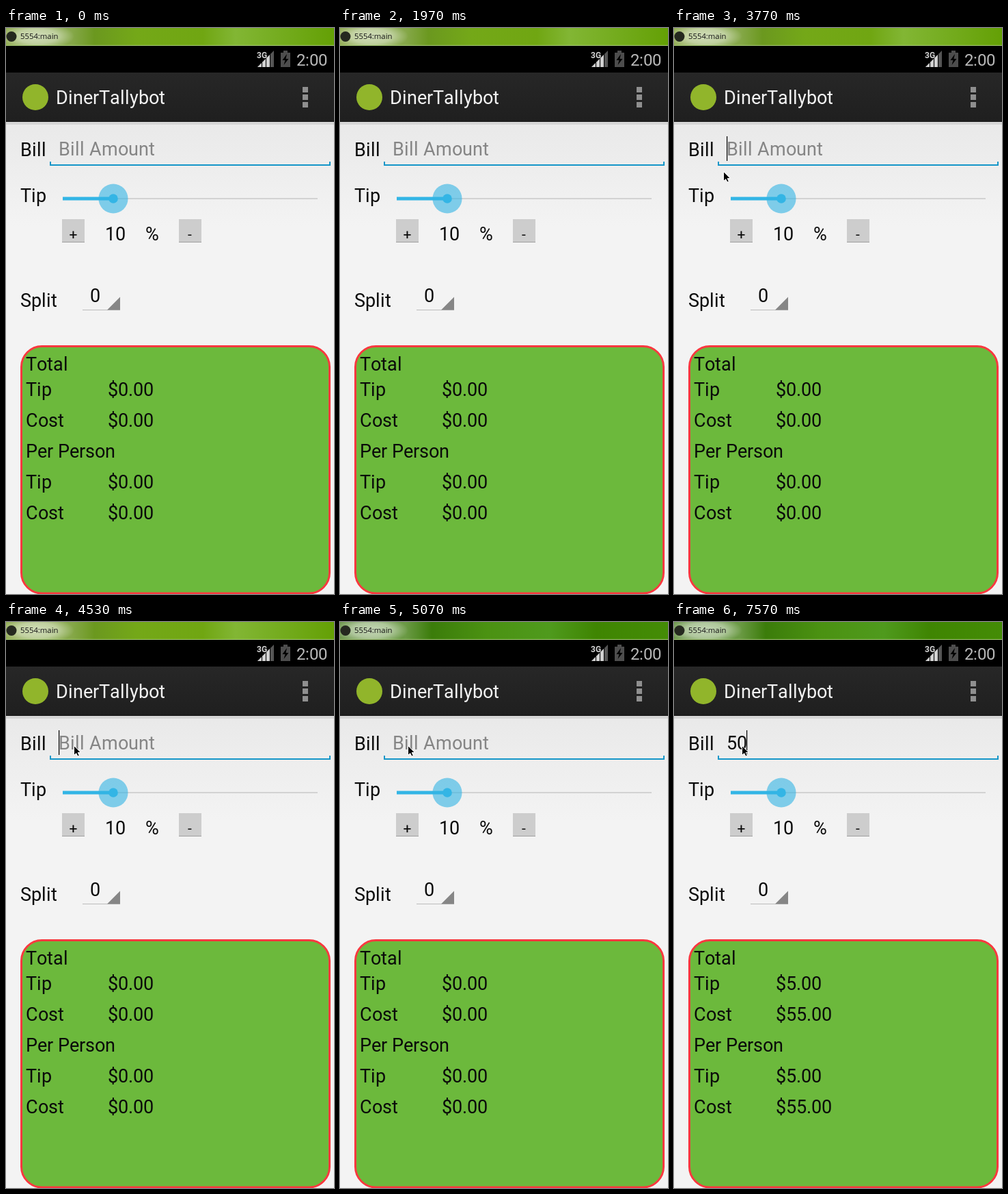
Recreate the animation shown at these times as an HTML page. Size 480 px wide and 826 px high, loop 8000 ms.

```html
<!DOCTYPE html>
<html lang="en">
<head>
<meta charset="utf-8">
<title>Tip form</title>
<style>
  html, body { margin: 0; width: 100%; height: 100%; overflow: hidden; background: #000; }
  svg { display: block; width: 480px; height: 826px; }
  text { font: 27px Roboto, sans-serif; fill: #0a0a0a; white-space: pre; }
  .clock { font-size: 24px; fill: #b9b9b9; }
  .net { font-size: 12px; font-weight: 700; fill: #d4d4d4; }
  .key { font-size: 21px; text-anchor: middle; }
  .name { fill: #f3f3f3; }
  .hint { fill: #858585; }
  .window { font: 11.3px "Open Sans", sans-serif; fill: #111; }
</style>
</head>
<body>
<svg viewBox="0 0 480 826">
  <defs>
    <linearGradient id="lime">
      <stop offset="0" stop-color="#94ae58"/>
      <stop offset=".2" stop-color="#86a84a"/>
      <stop offset=".27" stop-color="#6b981f"/>
      <stop offset=".4" stop-color="#74a818"/>
      <stop offset=".6" stop-color="#70a612"/>
      <stop offset=".7" stop-color="#82b634"/>
      <stop offset="1" stop-color="#64a005"/>
    </linearGradient>
    <linearGradient id="leaf">
      <stop offset="0" stop-color="#6f984e"/>
      <stop offset=".2" stop-color="#6b9a45"/>
      <stop offset=".28" stop-color="#3b7c0a"/>
      <stop offset=".45" stop-color="#4b9212"/>
      <stop offset=".64" stop-color="#4f9a1d"/>
      <stop offset=".78" stop-color="#3f8502"/>
      <stop offset="1" stop-color="#448c06"/>
    </linearGradient>
    <radialGradient id="glow">
      <stop offset="0" stop-color="#fff" stop-opacity=".6"/>
      <stop offset=".55" stop-color="#fff" stop-opacity=".45"/>
      <stop offset="1" stop-color="#fff" stop-opacity="0"/>
    </radialGradient>
    <linearGradient id="page" x2="0" y2="1">
      <stop offset="0" stop-color="#e9e9e9"/>
      <stop offset="1" stop-color="#f3f3f3"/>
    </linearGradient>
    <linearGradient id="bar" x2="0" y2="1">
      <stop offset="0" stop-color="#272727"/>
      <stop offset="1" stop-color="#1f1f1f"/>
    </linearGradient>
  </defs>

  <rect width="480" height="826"/>
  <rect id="frame" width="480" height="25" fill="url(#lime)"/>
  <ellipse cx="46" cy="12" rx="54" ry="20" fill="url(#glow)"/>
  <rect y="25" width="480" height="1" fill="#a9cf78"/>
  <rect y="26" width="480" height="20"/>
  <circle cx="8" cy="12.5" r="7.5" fill="#25291f"/>
  <text class="window" x="21" y="16">5554:main</text>

  <g id="app">
    <text class="net" x="367" y="44">3G</text>
    <path d="M392 33V57H368Z" fill="#555"/>
    <path d="M386 39V57H368Z" fill="#d0d0d0"/>
    <path d="M374.5 44V57M380.5 44V57M386.5 36V57" stroke="#000"/>
    <path d="M402 36H406V33H412V36H416V57H402Z" fill="#4d4d4d"/>
    <path d="M411 38L404.5 47H408.5L406.5 54L413.5 45H409.5Z"/>
    <text class="clock" x="425" y="55">2:00</text>

    <rect y="65" width="480" height="72" fill="url(#bar)"/>
    <circle cx="43" cy="101" r="19" fill="#91b52b"/>
    <text class="name" x="73" y="111">DinerTallybot</text>
    <path d="M434 86h8v8h-8zM434 97h8v8h-8zM434 108h8v8h-8z" fill="#8f8f8f"/>

    <rect y="137" width="480" height="689" fill="#f3f3f3"/>
    <rect y="137" width="480" height="153" fill="url(#page)"/>
    <rect y="136" width="480" height="1" fill="#111"/>
    <rect y="137" width="480" height="4" fill="#d5d5d5"/>

    <text x="21" y="187">Bill</text>
    <text id="bill" x="77" y="186"></text>
    <path d="M65 195V200H474V195" fill="none" stroke="#1596c8" stroke-width="2"/>

    <text x="21" y="254">Tip</text>
    <rect x="83" y="248" width="373" height="2" fill="#d2d2d2"/>
    <rect x="83" y="246.5" width="74" height="5" fill="#33b5e5"/>
    <circle cx="157" cy="249" r="21.5" fill="#33b5e5" fill-opacity=".6"/>
    <circle cx="157" cy="249" r="6.8" fill="#33b5e5"/>
    <path d="M82 279h33v33h-33zM253 279h33v33h-33z" fill="#cdcdcd"/>
    <path d="M82 312.5h33M253 312.5h33" stroke="#a0a0a0"/>
    <text class="key" x="98.5" y="308">+</text>
    <text class="key" x="269" y="308">-</text>
    <text x="145" y="310">10</text>
    <text x="204" y="310">%</text>

    <text x="21" y="407">Split</text>
    <text x="123" y="400">0</text>
    <path d="M112 411.5H167" stroke="#bcbcbc"/>
    <path d="M167 392.5V411.5H148Z" fill="#868686"/>

    <rect x="22.5" y="464.5" width="451" height="360.5" rx="30" fill="#6cb93c" stroke="#f9383f" stroke-width="3"/>
    <text x="29" y="500">Total</text>
    <text x="29" y="537">Tip</text>
    <text x="29" y="582">Cost</text>
    <text x="29" y="627">Per Person</text>
    <text x="29" y="672">Tip</text>
    <text x="29" y="717">Cost</text>
    <text class="tip" x="149" y="537"></text>
    <text class="cost" x="149" y="582"></text>
    <text class="tip" x="149" y="672"></text>
    <text class="cost" x="149" y="717"></text>
    <rect id="caret" y="158" width="1.2" height="36"/>
  </g>
  <path id="mouse" d="M.5 .5V14.5L3.7 11.6L6 16L8.3 15L6.2 10.5H10.3Z" stroke="#fff"/>
</svg>

<script>
const LOOP = 8000, RATE = 0.1;
const $ = id => document.getElementById(id);
const all = sel => document.querySelectorAll(sel);
const pen = document.createElement('canvas').getContext('2d');

// each track: [start ms, value...]
const carets = [
  [0, 0], [440, 77], [860, 0], [1390, 77], [1970, 0], [2490, 77], [3020, 0],
  [3630, 77], [4140, 0], [4530, 77], [5070, 0], [5750, 77], [6180, 91],
  [6430, 106], [6970, 0], [7570, 106]
];
const pointer = [
  [0, -50, -50], [3330, 43, 247], [3480, 63, 219], [3630, 64, 217],
  [3770, 72, 209], [3890, 82, 199], [4010, 91, 190], [4140, 97, 185],
  [4280, 98, 182], [4400, 99, 180]
];
const typed = [[0, ''], [6180, '5'], [6430, '50']];
const totals = [[0, 0], [6300, 5], [6430, 50]];
const screen = [[0, 1], [4670, 0], [5070, 1]];

const at = (track, t) => track.findLast(step => step[0] <= t).slice(1);
const money = n => '$' + n.toFixed(2);

// the phone sets each letter on a whole pixel
function snap(el) {
  const { fontWeight, fontSize, fontFamily } = getComputedStyle(el);
  pen.font = `${fontWeight} ${fontSize} ${fontFamily}`;
  let x = parseFloat(el.getAttribute('x'));
  const places = [...el.textContent].map(letter => {
    const left = x;
    x += Math.round(pen.measureText(letter).width);
    return left;
  });
  if (places.length) el.setAttribute('x', places.join(' '));
}

function write(el, text) {
  if (el.textContent === text) return;
  el.textContent = text;
  snap(el);
}

function draw(t) {
  const [caret] = at(carets, t), [x, y] = at(pointer, t);
  const [text] = at(typed, t), [bill] = at(totals, t);

  $('app').style.display = at(screen, t)[0] ? '' : 'none';
  $('frame').setAttribute('fill', t < 4670 ? 'url(#lime)' : 'url(#leaf)');
  $('bill').setAttribute('class', text ? '' : 'hint');
  write($('bill'), text || 'Bill Amount');
  $('caret').setAttribute('x', caret);
  $('caret').setAttribute('visibility', caret ? 'visible' : 'hidden');
  $('mouse').setAttribute('transform', `translate(${x} ${y})`);
  all('.tip').forEach(el => write(el, money(bill * RATE)));
  all('.cost').forEach(el => write(el, money(bill * (1 + RATE))));
}

all('text:not(.key, .window)').forEach(snap);
const start = performance.now();
function tick() {
  draw((performance.now() - start) % LOOP);
  requestAnimationFrame(tick);
}
tick();
</script>
</body>
</html>
```
